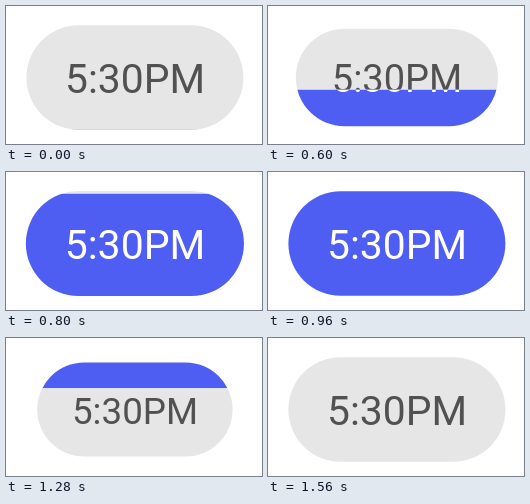
Animation, 256 px wide and 138 px high, one loop 1920 ms. Source, as an HTML page with a canvas:

```html
<!DOCTYPE html>
<html lang="en">
<head>
<meta charset="utf-8">
<title>Time chip toggle</title>
<style>
  html, body { margin: 0; width: 100%; height: 100%; overflow: hidden; background: #fff; }
  canvas { display: block; width: 256px; height: 138px; }
</style>
</head>
<body>
<canvas id="stage"></canvas>
<script>
const W = 256, H = 138, LOOP = 1920, STEP = 40;
const CX = 128.9, CY = 71.5, PILL_W = 217, PILL_H = 104.5;
const OFF = { fill: '#e6e6e6', text: '#515151' };
const ON = { fill: '#4f5ef2', text: '#ffffff' };

const canvas = document.getElementById('stage');
const ctx = canvas.getContext('2d');
const dpr = window.devicePixelRatio || 1;
canvas.width = Math.round(W * dpr);
canvas.height = Math.round(H * dpr);

const clamp = x => Math.min(1, Math.max(0, x));
const sine = x => (1 - Math.cos(Math.PI * clamp(x))) / 2;
const mix = (a, b, k) => a + (b - a) * k;

// cubic-bezier(.4, 0, .2, 1), solved by bisection
function standardEase(x) {
  if (x <= 0) return 0;
  if (x >= 1) return 1;
  let lo = 0, hi = 1, u = 0.5;
  for (let i = 0; i < 24; i++) {
    u = (lo + hi) / 2;
    const v = 1 - u;
    const bx = 1.2 * v * v * u + 0.6 * v * u * u + u * u * u;
    if (bx < x) lo = u; else hi = u;
  }
  return u * u * (3 - 2 * u);
}

// Shrink, overshoot, settle
function pressScale(e) {
  if (e < 200) return mix(1, 0.9, sine(e / 200));
  if (e < 365) return mix(0.9, 1.023, sine((e - 200) / 165));
  return mix(1.023, 1, sine((e - 365) / 115));
}

function drawChip(look) {
  ctx.fillStyle = look.fill;
  ctx.beginPath();
  ctx.roundRect(-PILL_W / 2, -PILL_H / 2, PILL_W, PILL_H, PILL_H / 2);
  ctx.fill();
  ctx.fillStyle = look.text;
  ctx.fillText('5:30PM', 0.1, 15.8);
}

function clipBand(top, bottom) {
  ctx.beginPath();
  ctx.rect(-W, top, 2 * W, bottom - top);
  ctx.clip();
}

function draw(t) {
  const time = Math.floor(t / STEP) * STEP;
  const turningOff = time >= 1160;
  const elapsed = Math.max(0, turningOff ? time - 1090 : time - 476);
  const [from, to] = turningOff ? [ON, OFF] : [OFF, ON];
  const level = mix(PILL_H / 2, -PILL_H / 2, standardEase(elapsed / 410));
  const scale = pressScale(elapsed);

  ctx.setTransform(dpr, 0, 0, dpr, 0, 0);
  ctx.fillStyle = '#fff';
  ctx.fillRect(0, 0, W, H);
  ctx.translate(CX, CY);
  ctx.scale(scale, scale);
  ctx.font = '40.8px Roboto, sans-serif';
  ctx.textAlign = 'center';
  ctx.textBaseline = 'alphabetic';

  // The new look rises from the bottom edge
  ctx.save();
  clipBand(-H, level <= -PILL_H / 2 ? -H : level);
  drawChip(from);
  ctx.restore();
  ctx.save();
  clipBand(level <= -PILL_H / 2 ? -H : level, H);
  drawChip(to);
  ctx.restore();
}

const start = performance.now();
function tick() {
  draw((performance.now() - start) % LOOP);
  requestAnimationFrame(tick);
}
tick();
</script>
</body>
</html>
```
